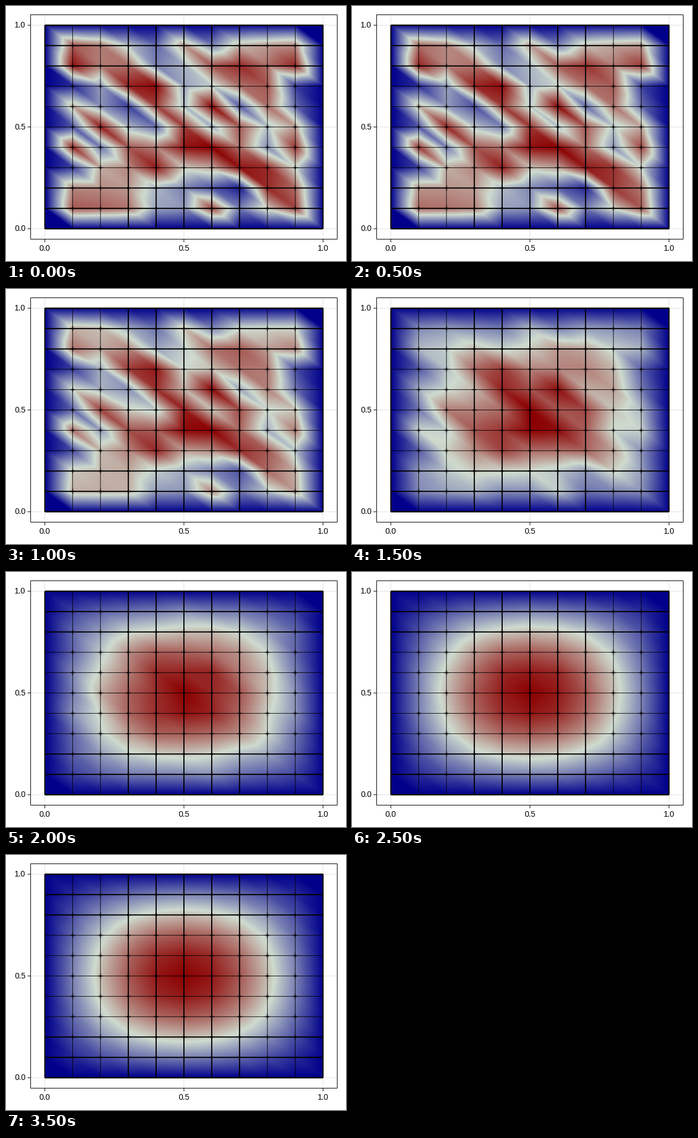
Animation, 600 px wide and 450 px high, one loop 4500 ms. Source, as a matplotlib script:

```python
import numpy as np
import matplotlib.pyplot as plt
from matplotlib.animation import FuncAnimation
from matplotlib.colors import LinearSegmentedColormap

W, H = 600, 450
PX = 0.72                                   # one pixel in points at 100 dpi
LEFT, RIGHT, TOP, BOTTOM = 43.5, 584.5, 15.5, 411.5
X0, X1, Y0, Y1 = 68.55, 559.45, 393.05, 33.95   # the unit square on the stage
N = 10
STEPS = 8

# Interior start values in percent, rows from top to bottom
START = """
80 72 45 25 66 30 60 65 69
95 72 75 30 42 80 90 75 90
10 36 92 97 38 48 75 80 15
61 35 15 85 43 97 22 75 25
20 92 42 26 86 40 80 45 65
90 28 80 72 95 99 75 33 87
15 62 70 93 56 63 95 90 52
70 69 66 42 30 20 7 90 76
80 78 74 38 35 84 30 57 84
"""

CMAP = LinearSegmentedColormap.from_list(
    "heat", [(0, "#00008b"), (0.52, "#cfdbcf"), (1, "#8b0000")], N=512)

start = np.pad(np.array(START.split(), float).reshape(N - 1, N - 1)[::-1], 1)
start /= start.max()
wave = np.sin(np.pi * np.arange(N + 1) / N)
limit = np.outer(wave, wave)


def field(step):
    """Power iteration: the first mode outgrows the rest at a fixed ratio."""
    u = start + 0.016 * (5.2**step - 1) * limit
    return u / u.max()


def cell_coords(count):
    s = (np.arange(count) + 0.5) / count * N
    i = s.astype(int)
    return i, s - i


ix, fx = cell_coords(491)
iy, fy = cell_coords(359)
IX, IY = np.meshgrid(ix, iy)
FX, FY = np.meshgrid(fx, fy)


def surface(u):
    """Linear interpolation on two triangles per cell."""
    a, b = u[IY, IX], u[IY, IX + 1]
    c, d = u[IY + 1, IX], u[IY + 1, IX + 1]
    lower = a + FX * (b - a) + FY * (c - a)
    upper = d + (1 - FX) * (c - d) + (1 - FY) * (b - d)
    return np.where(FX + FY <= 1, lower, upper)


def sx(x):
    return X0 + (X1 - X0) * x


def sy(y):
    return Y0 + (Y1 - Y0) * y


fig = plt.figure(figsize=(W / 100, H / 100), dpi=100, facecolor="white")
ax = fig.add_axes([0, 0, 1, 1])
ax.axis("off")


def line(xs, ys, width, z=4, **style):
    style = {"color": "black", "solid_capstyle": "butt", **style}
    ax.plot(xs, ys, lw=width * PX, zorder=z, snap=False, **style)


# Axis frame, grid, ticks and labels
for v in (0, 0.5, 1):
    x, y = sx(v), sy(v)
    line([x, x], [TOP, BOTTOM], 1, 1, color="#e0e0e0")
    line([LEFT, RIGHT], [y, y], 1, 1, color="#e0e0e0")
    line([x, x], [BOTTOM, BOTTOM + 5.5], 1)
    line([LEFT - 5.5, LEFT], [y, y], 1)
    font = dict(family="Liberation Sans", size=14 * PX, color="black")
    ax.text(x, 428, f"{v:.1f}", ha="center", va="center", **font)
    ax.text(34.5, y, f"{v:.1f}", ha="right", va="center", **font)
line([LEFT, RIGHT, RIGHT, LEFT, LEFT], [TOP, TOP, BOTTOM, BOTTOM, TOP], 1,
     solid_joinstyle="miter")

image = ax.imshow(surface(field(0)), extent=(X0, X1, Y0, Y1), origin="lower",
                  cmap=CMAP, vmin=0, vmax=1, interpolation="nearest",
                  aspect="auto", zorder=2)

# Wireframe
for i in range(N + 1):
    x, y = sx(i / N), sy(i / N)
    edge = i in (0, N)
    wide_x = 2 if edge or 3 <= i <= 7 else 0.9
    wide_y = 2.4 if edge else 0.9 if 3 <= i <= 7 else 2
    line([x, x], [Y1, Y0], wide_x)
    line([X0, X1], [y, y], wide_y)

# Small crosses where the cell edges meet
for i in range(1, N):
    for j in range(1, N):
        x, y = sx(i / N), sy(j / N)
        for reach, width in ((5, 1.6), (2.5, 2.6)):
            line([x - reach, x + reach], [y, y], width, 5, alpha=0.45)
            line([x, x], [y - reach, y + reach], width, 5, alpha=0.45)

ax.set_xlim(0, W)
ax.set_ylim(H, 0)


def draw(frame):
    image.set_data(surface(field(min(frame, STEPS - 1))))
    return [image]


# The last state holds for two frames
anim = FuncAnimation(fig, draw, frames=STEPS + 1, interval=500,
                     repeat=True, repeat_delay=0, blit=False)
plt.show()
```
